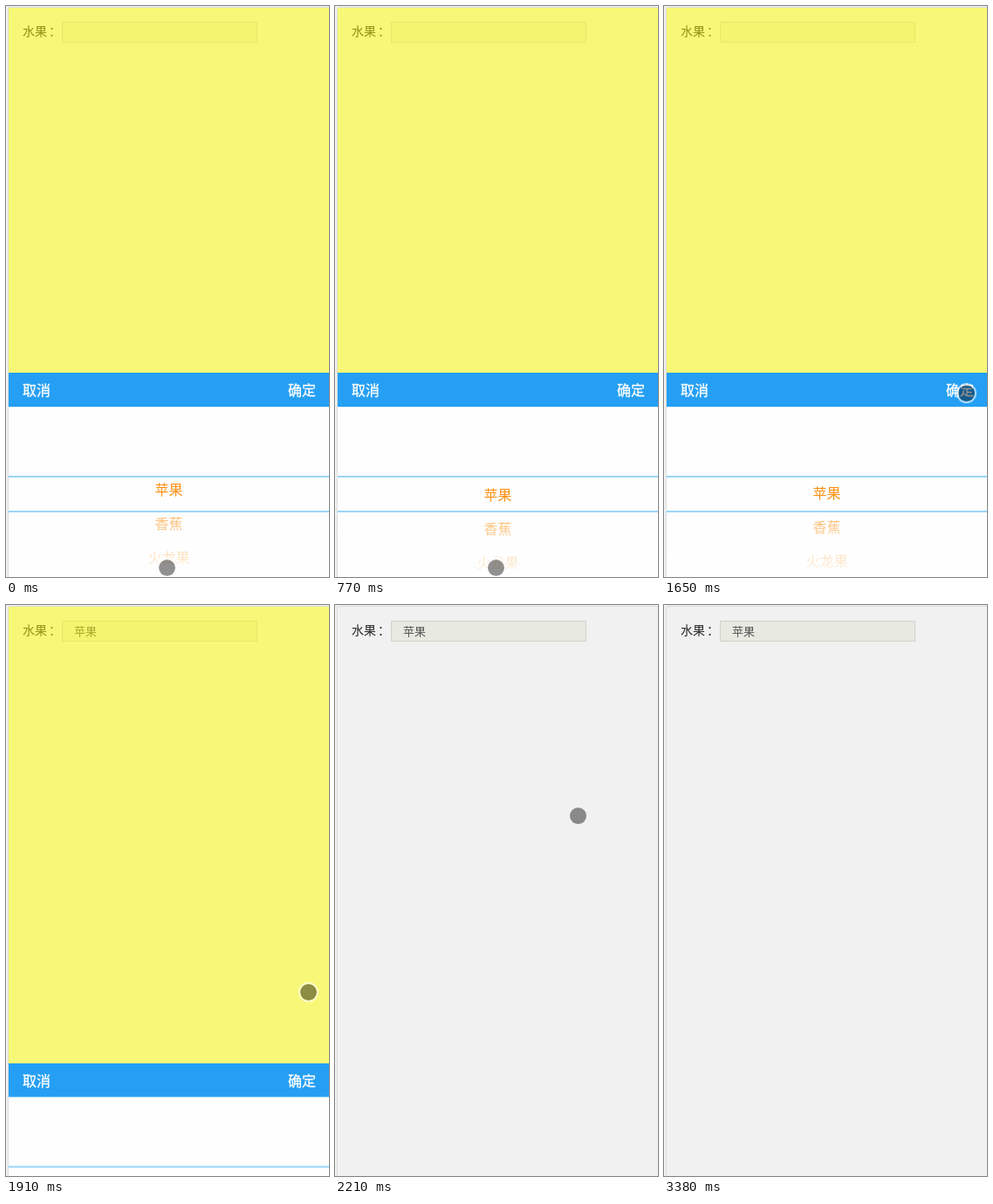
An HTML page for the animation above (4.29 s loop, 370 by 654 pixels).

```html
<!DOCTYPE html>
<html lang="zh-CN">
<head>
<meta charset="utf-8">
<title>水果</title>
<style>
  html, body { margin: 0; width: 100%; height: 100%; overflow: hidden; background: #f1f1f1; }
  body { position: relative; font: 16px/39px "Noto Sans CJK SC", "Noto Sans CJK", sans-serif; }
  div, span { position: absolute; box-sizing: border-box; white-space: nowrap; }
  #stage { left: 0; top: 0; width: 370px; height: 654px; overflow: hidden; }
  #page { left: 2px; top: 1px; width: 380px; height: 670px; border: 1px solid #dcdcdc; border-radius: 3px 0 0 0; }
  .label { top: 18px; font-size: 14px; line-height: 20px; color: #222; }
  #field { left: 64px; top: 18px; width: 224px; height: 24px; border: 1px solid #d0d3cb; background: #e8e9e1; }
  #value { left: 13px; top: 0; font-size: 13px; line-height: 22px; color: #555; }
  #shade { left: 3px; top: 2px; width: 367px; height: 652px; background: rgba(255, 255, 0, .5); }
  #panel { left: 3px; top: 420px; width: 367px; height: 234px; overflow: hidden; background: #fefefe; }
  #bar { left: 0; top: 0; width: 100%; height: 39px; background: #259ff3; color: #fff; -webkit-text-stroke: .3px #fff; }
  #list { left: 0; top: 0; width: 100%; line-height: 39px; white-space: pre-line; text-align: center; color: #fb9114; }
  #fade { left: 0; top: 160px; width: 100%; height: 74px;
    background: linear-gradient(rgba(254, 254, 254, .36), rgba(254, 254, 254, .95)); }
  .rule { left: 0; width: 100%; height: 2px; background: #98d5f8; }
  #touch { left: 0; top: 0; width: 19px; height: 19px; border-radius: 50%; background: rgba(0, 0, 0, .43); }
  #ring { inset: -2px; border: 2px solid rgba(255, 255, 255, .6); border-radius: 50%; }
</style>
</head>
<body>
<div id="stage">
  <div id="page"></div>
  <span class="label" style="left:19px">水果</span>
  <span class="label" style="left:49px">：</span>
  <div id="field"><span id="value">苹果</span></div>
  <div id="shade"></div>
  <div id="panel">
    <div id="bar">
      <span style="left:16px">取消</span>
      <span style="right:15px">确定</span>
    </div>
    <div id="list">苹果<br>香蕉<br>火龙果</div>
    <div id="fade"></div>
    <div class="rule" style="top:118px"></div>
    <div class="rule" style="top:158px"></div>
  </div>
  <div id="touch"><div id="ring"></div></div>
</div>
<script>
  const LOOP = 4290, TICK = 130;
  const CHOSEN = 1910, CLOSED = 2210, RELEASED = 3380;

  function loop(id, frames) {
    const animation = document.getElementById(id).animate(frames, { duration: LOOP, iterations: Infinity });
    animation.startTime = document.timeline.currentTime;
  }

  // Moves evenly between points [ms, x, y], in jumps about one tick apart.
  function travel(id, points) {
    const [, ...last] = points[points.length - 1];
    const path = [...points, [LOOP, ...last]];
    loop(id, path.map(([ms, x, y], i) => {
      const next = path[i + 1] || path[i];
      const jumps = Math.max(1, Math.round((next[0] - ms) / TICK));
      return { offset: ms / LOOP, transform: `translate(${x}px, ${y}px)`, easing: `steps(${jumps})` };
    }));
  }

  function show(id, from, to) {
    const edge = (ms, visibility) => ({ offset: ms / LOOP, visibility, easing: 'step-end' });
    loop(id, [edge(0, from ? 'hidden' : 'visible'), edge(from, 'visible'),
      edge(to, to < LOOP ? 'hidden' : 'visible'), edge(LOOP, to < LOOP ? 'hidden' : 'visible')]);
  }

  show('value', CHOSEN, LOOP);
  show('shade', 0, CLOSED);
  show('panel', 0, CLOSED);
  show('ring', 0, CLOSED);
  show('touch', 0, RELEASED);

  travel('list', [[0, 0, 114], [240, 0, 118], [769, 0, 118], [770, 0, 120], [1020, 0, 118]]);
  travel('panel', [[0, 0, 0], [CHOSEN - TICK, 0, 0], [CHOSEN + TICK, 0, 209]]);
  travel('touch', [
    [0, 175, 634], [900, 175, 634], [1260, 200, 537], [1650, 337, 434],
    [CHOSEN, 337, 434], [2040, 274, 256], [CLOSED, 269, 232], [2330, 269, 248],
    [2480, 310, 446], [2630, 318, 564], [2900, 331, 396], [3020, 341, 278], [3260, 348, 643]
  ]);
</script>
</body>
</html>
```
